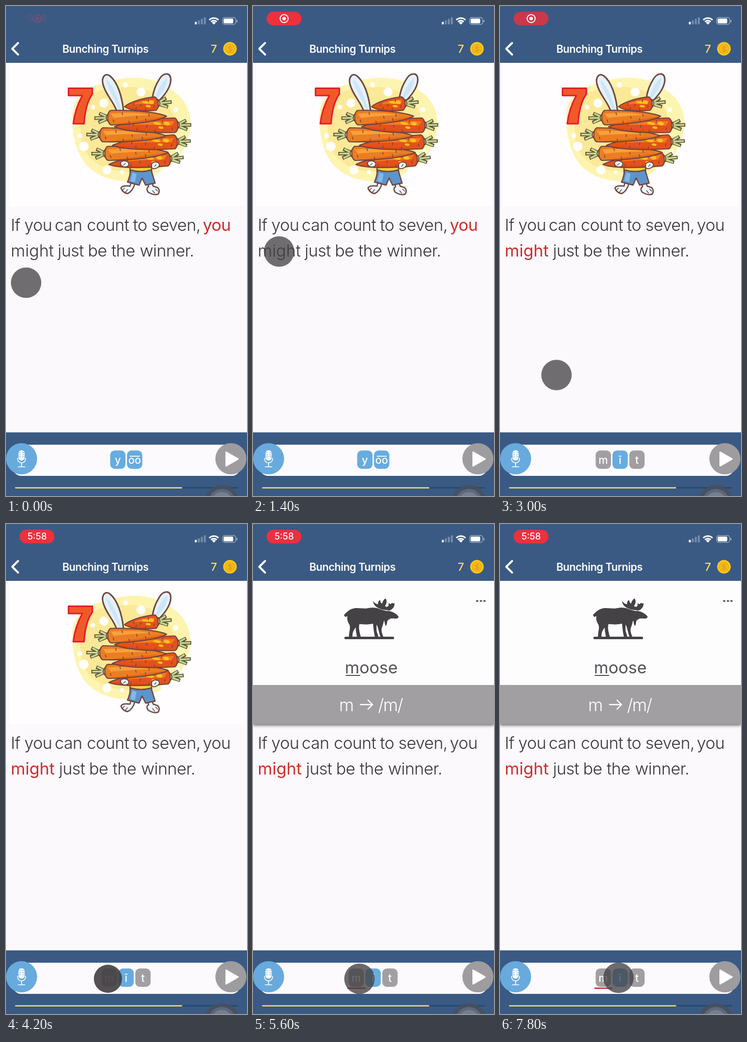
Write an HTML page with a canvas that moves like this. It is 480 px wide and 974 px high and loops after 8 s.

```html
<!DOCTYPE html>
<html lang="en">
<head>
<meta charset="utf-8">
<title>Reading lesson</title>
<style>
html, body { margin: 0; width: 100%; height: 100%; overflow: hidden; background: #fbf9fc; }
canvas { display: block; width: 100%; height: 100%; }
</style>
</head>
<body>
<canvas id="stage"></canvas>
<script>
const W = 480, H = 974, LOOP = 8000, STEP = 200;
const NAVY = '#3a5a84', BLUE = '#67acdf', GREY = '#a19fa2', INK = '#39363b', RED = '#c9302c';
const OUTLINE = '#70453f';
const canvas = document.getElementById('stage');
const c = canvas.getContext('2d');
const scale = Math.max(1, window.devicePixelRatio || 1);
canvas.width = W * scale;
canvas.height = H * scale;

// Smoothly interpolates rows of [time, value, ...].
function track(rows, t) {
  if (t <= rows[0][0]) return rows[0].slice(1);
  for (let i = 1; i < rows.length; i++) {
    const a = rows[i - 1], b = rows[i];
    if (t > b[0]) continue;
    const u = (t - a[0]) / (b[0] - a[0]), e = u * u * (3 - 2 * u);
    return a.slice(1).map((v, k) => v + (b[k + 1] - v) * e);
  }
  return rows[rows.length - 1].slice(1);
}

function rect(x, y, w, h, fill, r = 0) {
  c.beginPath();
  c.roundRect(x, y, w, h, r);
  c.fillStyle = fill;
  c.fill();
}

function circle(x, y, r, fill) {
  c.beginPath();
  c.arc(x, y, r, 0, Math.PI * 2);
  c.fillStyle = fill;
  c.fill();
}

function ring(x, y, r, color, w) {
  c.beginPath();
  c.arc(x, y, r, 0, Math.PI * 2);
  c.strokeStyle = color;
  c.lineWidth = w;
  c.stroke();
}

function shape(d, fill, stroke, w = 2.5) {
  const p = new Path2D(d);
  if (fill) { c.fillStyle = fill; c.fill(p); }
  if (stroke) { c.strokeStyle = stroke; c.lineWidth = w; c.stroke(p); }
}

function text(s, x, y, size, weight, color, align = 'left', spacing = 0) {
  c.font = `${weight} ${size}px Inter, sans-serif`;
  c.letterSpacing = spacing + 'px';
  c.textAlign = align;
  c.fillStyle = color;
  c.fillText(s, x, y);
}

function leaves() {
  const stems = cut => `M-8 -2L${-23 + cut} -9M-8 0L${-33 + cut} 0M-8 2L${-25 + cut} 9`;
  c.lineCap = 'butt';
  shape(stems(0), null, '#5d5038', 7);
  shape(stems(1.8), null, '#c6d990', 3.6);
  c.lineCap = 'round';
}

// A carrot from its thick end (x, y) to its tip.
function carrot(x, y, tipX, tipY, h, base, light, spots) {
  const L = Math.hypot(tipX - x, tipY - y), flip = tipX < x ? -1 : 1;
  c.save();
  c.translate(x, y);
  c.scale(flip, 1);
  c.rotate(Math.atan2(tipY - y, Math.abs(tipX - x)));
  leaves();
  shape('M-5 -8Q-14 0 -5 8L0 6V-6Z', '#e5e3a0', OUTLINE, 2);
  const body = `M0 ${-h}C${L * .45} ${-h} ${L * .85} ${-h * .5} ${L} 0` +
    `C${L * .85} ${h * .65} ${L * .45} ${h} 0 ${h}C${-h * .6} ${h * .8} ${-h * .6} ${-h * .8} 0 ${-h}Z`;
  shape(body, base);
  c.save();
  c.clip(new Path2D(body));
  shape(`M0 ${-h * .55}Q${L * .4} ${-h * .75} ${L * .75} ${-h * .2}Q${L * .35} ${-h * .2} ${L * .05} ${h * .05}Z`, light);
  shape(`M0 ${h}Q${L * .5} ${h * .5} ${L} 0V${h * 1.3}H0Z`, 'rgba(205,65,20,.35)');
  if (spots) {
    for (const [u, v, rx, ry] of [[.13, -.25, 6, 3.6], [.29, -.3, 8, 2.6], [.23, .28, 5, 2.2]]) {
      c.beginPath();
      c.ellipse(L * u, h * v, rx, ry, -.2, 0, 7);
      c.fillStyle = '#fbc21b';
      c.fill();
    }
  }
  c.restore();
  shape(body, null, OUTLINE, 2.2);
  for (const [u, v] of [[.04, .3], [.2, -.65], [.32, .55], [.46, -.1], [.62, .25], [.68, -.35]])
    shape(`M${L * u} ${h * v}l1 ${h * .3}`, null, OUTLINE, 1.5);
  c.restore();
}

function picture() {
  rect(6, 113, 469, 285, '#fffdfe');
  shape('M132 225C130 188 153 160 196 154C242 135 300 139 333 169C366 190 377 235 359 270' +
    'C348 309 313 326 288 340C252 357 196 348 169 324C146 306 133 270 132 225Z', '#fdf4b0');
  shape('M148 235C143 190 171 164 214 164C264 153 320 171 333 217C343 261 321 309 274 323' +
    'C221 341 162 316 150 271Z', '#fbe998');
  for (const [x, y, r] of [[195, 193, 9], [173, 201, 4.5], [155, 279, 9.5], [147, 258, 5], [201, 326, 9],
    [231, 330, 4], [269, 171, 9], [238, 157, 5], [338, 206, 5], [314, 323, 6], [342, 289, 4]])
    circle(x, y, r, '#fffefa');

  shape('M234 208C231 179 222 151 207 139C197 132 190 142 193 155C199 178 213 187 221 210Z', '#e4f1fb', OUTLINE, 3);
  shape('M230 207C222 180 212 158 201 146C198 158 215 178 225 207Z', '#cde5f7');
  shape('M306 187C319 174 330 157 328 143C326 132 314 133 307 143C298 157 294 167 291 186Z', '#e4f1fb', OUTLINE, 3);
  shape('M302 183C315 169 322 155 321 142C309 154 301 165 298 184Z', '#cde5f7');
  shape('M124.500 163.500H172V175Q158 194 155.500 234H134Q137 205 152 178H124.500Z', '#f05a28', '#e71931', 3);

  shape('M247 315H290V331H247Z', '#f7cf3d', OUTLINE);
  shape('M249 350L247 358Q231 356 229 362Q232 371 242 373Q253 368 257 352Z', '#eaf5fc', OUTLINE);
  shape('M281 350L284 359Q278 363 283 370Q294 377 303 374Q308 367 302 361L293 358L291 350Z', '#eaf5fc', OUTLINE);
  shape('M236 362l-4 4M242 365l-4 5M298 364l4 4M292 367l4 5', null, OUTLINE, 1.5);
  shape('M248 326Q269 332 289 326Q293 339 297 352L278 356L271 342L265 356L242 350Q247 339 248 326Z', '#5d94cb', OUTLINE);
  shape('M252 331Q249 340 248 348L257 350L260 334Z', '#83b9e6');

  const deep = '#e4521c', warm = '#ec7d22';
  carrot(321, 304, 205, 315, 14, deep, '#f27b21', true);
  carrot(203, 293, 323, 291, 14, warm, '#f7a13d');
  carrot(335, 270, 212, 277, 14, deep, '#f27b21', true);
  carrot(193, 256, 319, 258, 14, warm, '#f7a13d');
  carrot(336, 237, 216, 240, 14.5, deep, '#f27b21', true);
  carrot(209, 222, 320, 219, 14.5, warm, '#f7a13d');
  carrot(297, 194, 236, 200, 13.5, deep, '#f27b21', true);

  shape('M229 310Q234 306 241 309Q247 313 243 318Q236 322 231 318Q226 314 229 310Z', '#eaf5fc', OUTLINE, 2);
  shape('M290 314Q296 307 304 312Q308 317 302 321Q294 326 290 321Z', '#eaf5fc', OUTLINE, 2);
  shape('M234 316l4 -3M296 319l3 -4', null, OUTLINE, 1.3);
}

function sentence(onMight) {
  const words = [['If', 9.5], ['you', 36.5], ['can', 97], ['count', 161], ['to', 253], ['seven,', 289.5]];
  const tail = [['just', 103], ['be', 163], ['the', 210], ['winner.', 266.5]];
  const word = (s, x, y, hot, spacing = -.55) =>
    text(s, x, y, 33, hot ? 400 : 300, hot ? RED : INK, 'left', spacing);
  words.forEach(([s, x]) => word(s, x, 447));
  word('you', 392, 447, !onMight);
  word('might', 9.5, 498, onMight, 0);
  tail.forEach(([s, x]) => word(s, x + (onMight ? 2.5 : 0), 498));
}

function moose() {
  shape('M181 181C186 176 192 168 205 167L225 168C238 165 247 166 255 170L266 173C275 171 290 181 290 185' +
    'C288 190 280 187 274 188C270 190 267 191 267 197L265 203C261 198 263 193 261 192L258 203' +
    'C254 210 257 218 260 225H254C250 214 250 206 246 200L246 212L250 225H243C240 212 240 206 239 198' +
    'C228 201 218 199 212 199C210 206 212 215 215 225H207C206 216 204 212 205 206C200 210 198 216 198 225' +
    'H191C191 214 195 206 192 200C188 194 187 188 188 183L184 185Z', '#454246');
  shape('M257 170C248 167 240 163 239 153C243 158 247 160 249 159C249 154 251 152 253 151' +
    'C254 155 255 158 257 158C259 153 260 150 264 148C267 152 267 157 263 163C266 166 268 165 270 162' +
    'L270 157C273 160 275 160 276 157L282 158C282 164 279 169 272 172Z', '#454246');
  rect(182, 224, 99, 5, '#454246', 2.5);
}

function panel(t) {
  if (t < 5000) return;
  const [dy] = track([[5000, -285], [5200, -235], [5400, -52], [5600, 0]], t);
  const [dx] = track([[5200, 8], [5400, 4], [5600, 0], [5800, 4]], t);
  c.save();
  c.translate(0, dy);
  c.save();
  c.shadowColor = 'rgba(0,0,0,.65)';
  c.shadowBlur = 6 * scale;
  c.shadowOffsetY = 2 * scale;
  rect(0, 113, W, 285, GREY);
  c.restore();
  rect(0, 113, W, 207, '#fefdfe');
  [446.5, 454, 461].forEach(x => rect(x - 2.5, 151.5, 5, 3, '#49464a', 1.5));
  c.translate(dx, 0);
  moose();
  text('moose', 183, 297, 33, 400, '#555257');
  rect(184.5, 300, 29, 2, '#555257');
  text('m', 171.5, 372, 34, 300, '#fff');
  shape('M214 359H238M229 350L238 359L229 368', null, '#fff', 2.3);
  text('/m/', 249, 372, 34, 300, '#fff', 'left', -1.5);
  c.restore();
}

function statusPill(t) {
  const phase = ((t - 3000) / 2200 % 1 + 1) % 1;
  const pulse = .8 + .2 * Math.min(1, Math.sin(Math.PI * phase) * 1.6);
  const [shown] = track([[0, 0], [600, 1]], t);
  const [clock] = track([[3200, 0], [3800, 1]], t);
  c.globalAlpha = pulse * shown;
  rect(27, 11.5, 69.5, 27, '#f0303c', 13.5);
  const icon = shown ? '#fff' : '#b34b62';
  c.globalAlpha = shown ? (1 - clock) * shown : .4;
  ring(62, 25, 8, icon, 2);
  circle(62, 25, 3.6, icon);
  c.globalAlpha = shown ? clock : .3;
  text('5:58', 62, 31, 18, 500, shown ? '#fff' : '#b34b62', 'center');
  c.globalAlpha = 1;
}

function header(t) {
  rect(0, 0, W, 113, NAVY);
  statusPill(t);
  for (let i = 0; i < 4; i++) {
    const h = 5 + i * 3;
    rect(376 + i * 6, 36.5 - h, 4, h, i ? 'rgba(255,255,255,.3)' : '#fff', 1);
  }
  c.save();
  c.lineCap = 'butt';
  for (const r of [8, 13]) {
    c.beginPath();
    c.arc(414, 37, r, -Math.PI * .75, -Math.PI * .25);
    c.strokeStyle = '#fff';
    c.lineWidth = 3;
    c.stroke();
  }
  c.restore();
  shape('M414 37L410 33Q414 29.500 418 33Z', '#fff');
  c.beginPath();
  c.roundRect(431.5, 23, 26, 13.5, 4);
  c.strokeStyle = 'rgba(255,255,255,.5)';
  c.lineWidth = 1.4;
  c.stroke();
  rect(433.5, 25, 19, 9.5, '#fff', 2);
  rect(459, 27.5, 2, 5, 'rgba(255,255,255,.5)', 1);

  shape('M24 73.500L12.500 85L24 96.500', null, '#fff', 4);
  text('Bunching Turnips', 198, 92.5, 21, 600, '#fff', 'center', -.4);
  text('7', 414, 93, 22, 500, '#ffe05c', 'center');
  circle(446, 85, 13.5, '#fcc81c');
  circle(446, 85, 9.5, '#f5ba19');
  ring(446, 85, 9.5, '#e6a514', 1.2);
  text('$', 446, 90.5, 15, 500, '#dc9b13', 'center');
}

function tile(s, x, blue) {
  rect(x, 883.5, 30.5, 36.5, blue ? BLUE : GREY, 9);
  text(s, x + 15.2, 909.5, 21, 500, '#fff', 'center');
}

function microphone() {
  circle(31, 900, 31, '#68aadd');
  rect(24.7, 883, 12.6, 20.5, '#fff', 6.3);
  for (const y of [888, 892, 896]) shape(`M25 ${y}H29.500M32.500 ${y}H37`, null, BLUE, 1.2);
  shape('M23 899Q23 908 31 908Q39 908 39 899M31 908V915M24.500 916H37.500', null, '#fff', 1.7);
}

function footer(t, onMight) {
  rect(0, 847.5, W, H, NAVY);
  rect(14, 872, 452, 62, '#fcfafd', 16);
  microphone();

  circle(448, 900, 31, '#9e9c9f');
  shape('M438.500 887L462 900.500L438.500 914Z', '#fff', '#fff', 3);

  if (onMight) {
    tile('m', 190.5);
    tile('ī', 224, true);
    tile('t', 257.5);
  } else {
    tile('y', 207.5, true);
    tile('oo', 241, true);
    rect(246.5, 894, 20, 1.8, '#fff');
  }
  if (t >= 4800) rect(188, 921.5, 36, 2.5, '#c3262c');

  rect(18, 956.5, 444, 2.5, '#21496b', 1);
  rect(18, 956.5, 333, 2.5, '#f3dc72', 1);
  circle(430, 987, 35, 'rgba(72,80,94,.85)');
  circle(430, 987, 27, 'rgba(100,111,128,.8)');
  circle(430, 987, 21, 'rgba(125,136,152,.7)');
}

function touch(t) {
  const [x, y, r, alpha] = track([
    [0, 40, 550, 30.3, .75], [400, 40, 550, 30.3, .75], [1400, 52, 488, 30.3, .75],
    [1800, 52, 488, 30.3, .75], [3000, 112.5, 733.5, 30.3, .75], [3800, 203, 904, 30, .78],
    [4200, 203, 904, 28, .9], [5200, 203, 904, 30.3, .78], [5600, 212, 904, 30.3, .78],
    [7800, 236, 902, 30.3, .76]], t);
  circle(x, y, r, `rgba(66,63,66,${alpha})`);
}

function draw(t) {
  const onMight = t >= 1800;
  c.setTransform(scale, 0, 0, scale, 0, 0);
  c.lineCap = c.lineJoin = 'round';
  rect(0, 0, W, H, '#fbf9fc');
  picture();
  sentence(onMight);
  panel(t);
  header(t);
  footer(t, onMight);
  touch(t);
}

const start = performance.now();
function tick() {
  const t = (performance.now() - start) % LOOP;
  draw(Math.floor(t / STEP) * STEP);
  requestAnimationFrame(tick);
}
tick();
</script>
</body>
</html>
```
